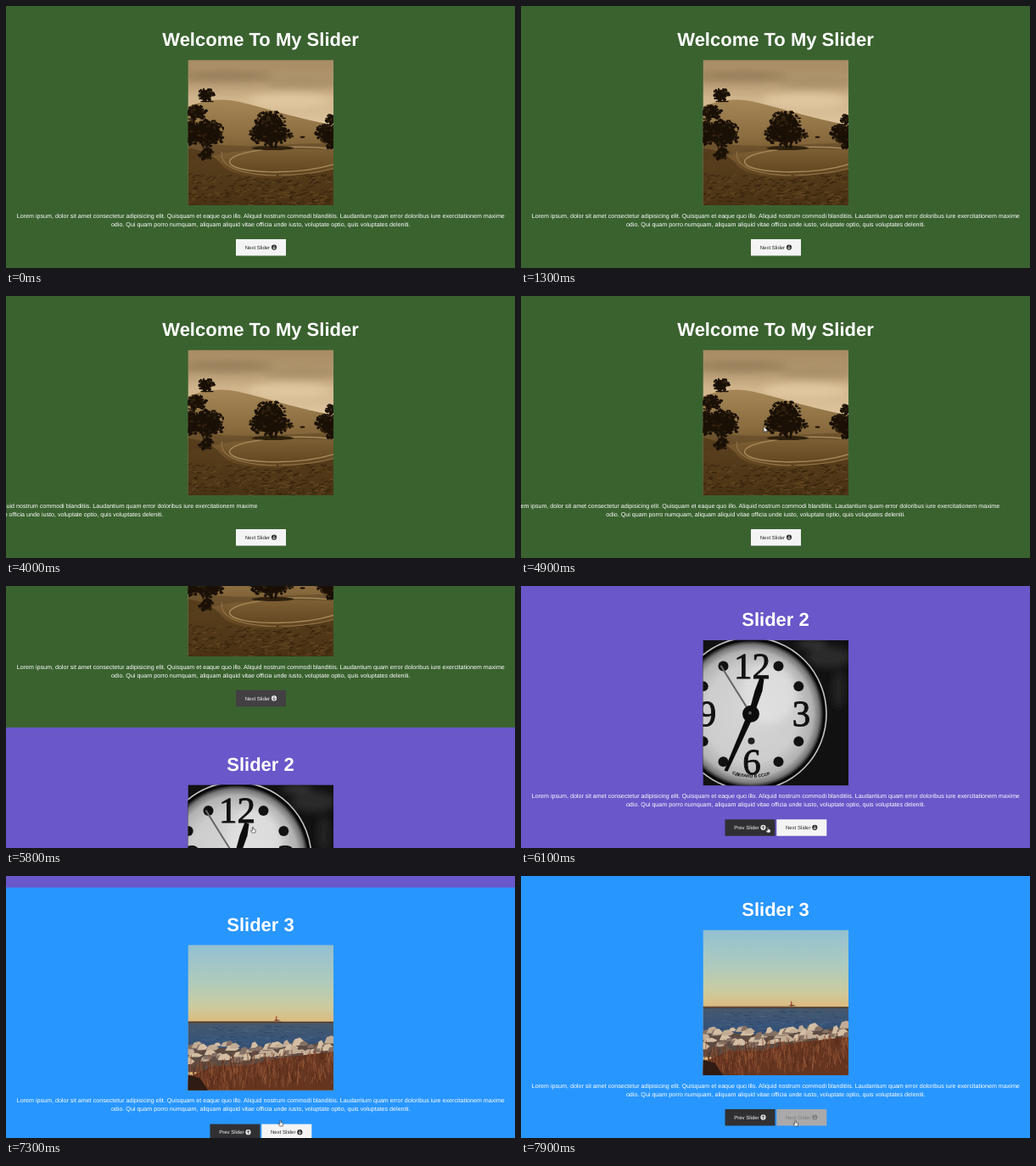
These frames come from a looping animation (600 by 309 pixels, 8 s). An HTML page:

```html
<!DOCTYPE html>
<html lang="en">
<head>
<meta charset="utf-8">
<title>Slider</title>
<style>
  html, body { margin: 0; width: 100%; height: 100%; overflow: hidden; background: #3a622f; }
  svg { display: block; width: 100%; height: 100%; }
  text { font-family: "Liberation Sans", Arial, sans-serif; text-rendering: geometricPrecision; }
  .title { font-size: 22px; font-weight: bold; fill: #fff; text-anchor: middle; }
  .copy { font-size: 7.13px; fill: #fff; text-anchor: middle; }
  .label { font-size: 6.03px; }
  .numeral { font: 43px "Liberation Serif", serif; fill: #111; stroke: #111; stroke-width: .9; text-anchor: middle; }
</style>
</head>
<body>
<svg id="stage" viewBox="0 0 600 309"></svg>
<script>
const LOOP = 8000, SLIDE = 323, PHOTO = 171.5;
const LIGHT = [244, 244, 244], DARK = [48, 48, 51], HOVER = [66, 64, 66], INK = [40, 40, 42];

let seed = 7;
const random = () => (seed = seed * 16807 % 2147483647) / 2147483647;
const between = (a, b) => a + (b - a) * random();
const repeat = (n, make) => Array.from({ length: n }, (_, i) => make(i)).join('');
const rgb = c => `rgb(${c.map(Math.round)})`;
const mix = (a, b, k) => rgb(a.map((v, i) => v + (b[i] - v) * k));
const shape = (d, fill, extra = '') => `<path d="${d}" fill="${fill}" ${extra}/>`;
const line = (d, stroke, width) => shape(d, 'none', `stroke="${stroke}" stroke-width="${width}"`);
const ellipse = (x, y, rx, ry, fill, extra = '') =>
  `<ellipse cx="${x}" cy="${y}" rx="${rx}" ry="${ry}" fill="${fill}" ${extra}/>`;
const stops = list => list.map(([at, color]) => `<stop offset="${at}" stop-color="${color}"/>`).join('');
const gradient = (id, ...list) => `<linearGradient id="${id}" x2="0" y2="1">${stops(list)}</linearGradient>`;
const radial = (id, ...list) => `<radialGradient id="${id}">${stops(list)}</radialGradient>`;
const backdrop = fill => `<rect width="172" height="172" fill="${fill}"/>`;

// A ragged crown: many small leaf clumps scattered over an ellipse
const tree = (x, y, rx, ry, clumps) => ellipse(x, y, rx * .72, ry * .72, '#1a1006') + repeat(clumps, () => {
  const a = between(0, 6.28), r = Math.sqrt(random());
  return ellipse(x + Math.cos(a) * r * rx * .95, y + Math.sin(a) * r * ry * .95,
    between(1, 2.6), between(.8, 2), random() < .85 ? '#1a1006' : '#33230f');
});

function hills() {
  return gradient('sepia', [0, '#a78c64'], [.14, '#b0966f'], [.26, '#cfb48b'], [.42, '#dcc39c']) +
    gradient('meadow', [0, '#a58757'], [.35, '#8a6c3f'], [.65, '#684b24'], [1, '#38230c']) +
    backdrop('url(#sepia)') +
    '<g filter="url(#soft)">' +
      ellipse(45, 19, 55, 6, '#8a7351', 'opacity=".6"') + ellipse(135, 28, 45, 5, '#a0875f', 'opacity=".6"') +
      ellipse(120, 48, 50, 9, '#e4cda6', 'opacity=".7"') + '</g>' +
    shape('M0 55Q30 43 58 49C98 58 130 70 172 77V172H0Z', 'url(#meadow)') +
    shape('M0 96Q45 103 90 101T172 98V106Q90 103 42 110L0 120Z', '#49351a', 'opacity=".35"') +
    shape('M0 104Q28 108 40 124Q52 140 110 139L172 128V172H0Z', '#4f3717', 'opacity=".75"') +
    line('M172 105Q120 99 75 108C32 116 45 131 95 132Q140 133 172 123', '#a58a5a', 1.4) +
    line('M40 108Q36 132 95 136Q140 137 172 128', '#8d7144', 1.2) +
    repeat(260, () => {
      const x = between(0, 170), y = between(136, 172);
      return line(`M${x} ${y}l${between(2, 7)} ${between(-3, 1)}`, random() < .65 ? '#2f1d09' : '#6c5026', .8);
    }) +
    tree(21, 41, 10, 8, 45) + line('M21 44V50M15 49H30', '#1a1006', 1.2) +
    tree(10, 62, 13, 9, 60) + tree(23, 87, 21, 18, 150) + tree(4, 84, 9, 18, 60) + tree(21, 111, 9, 7, 35) +
    tree(97, 76, 20, 18, 130) + tree(97, 88, 27, 13, 140) + ellipse(100, 104, 25, 2.5, '#2e200d') +
    line('M97 84L99 104M105 90L103 104', '#1a1006', 3) +
    tree(163, 86, 13, 11, 80) + tree(169, 99, 5, 9, 30) + tree(168, 70, 5, 6, 25) +
    ellipse(135, 91, 3, 1.2, '#1a1006');
}

function clock() {
  const cx = 56.5, cy = 87;
  const dots = repeat(12, i => {
    if (i % 3 === 0) return '';
    const a = i * Math.PI / 6;
    return ellipse(cx + 65 * Math.sin(a), cy - 65 * Math.cos(a), 6, 6, '#111');
  });
  const numeral = (value, x, y) => `<text class="numeral" x="${x}" y="${y}">${value}</text>`;
  return radial('dial', [0, '#d6d6d6'], [.65, '#cdcdcd'], [.86, '#b2b2b2'], [.95, '#777'], [1, '#1c1c1c']) +
    backdrop('#111') +
    '<g filter="url(#soft)">' + ellipse(148, 20, 26, 12, '#2c2c2c') + ellipse(128, 5, 18, 4, '#3a3a3a') +
      ellipse(160, 58, 8, 22, '#222') + '</g>' +
    ellipse(cx, cy, 89, 90, '#080808', 'stroke="#c4c4c4" stroke-width="1.6"') +
    ellipse(cx, cy, 85, 86, 'url(#dial)') +
    ellipse(78, 62, 32, 36, '#eee', 'opacity=".45" filter="url(#soft)"') + dots +
    numeral(12, 58, 45) + numeral(3, 116, 101) + numeral(6, 57.5, 158) + numeral(9, 5, 101) +
    ellipse(57, 119, 4, 4, '#222') +
    '<path id="rim" d="M26 154Q57 170 92 154" fill="none"/>' +
    '<text font-size="5" font-weight="bold"><textPath href="#rim" startOffset="9">СДЕЛАНО В СССР</textPath></text>' +
    line(`M${cx} ${cy}L21 30`, '#666', 2) +
    shape('M53 86L25 154L29 155L60 89Z', '#0c0c0c') +
    shape('M54 86L61 60L67 44L72 46L70 60L60 88Z', '#0c0c0c') +
    ellipse(cx, cy, 10, 10, '#0c0c0c') + ellipse(cx - 1, cy - 1, 2, 2, '#555');
}

function shore() {
  return gradient('dusk', [0, '#93c0d2'], [.25, '#aecbbd'], [.42, '#cbcb9f'], [.54, '#dfb97c']) +
    gradient('lake', [0, '#46586c'], [.4, '#385478'], [1, '#2d456a']) +
    backdrop('url(#dusk)') +
    '<rect y="92" width="172" height="50" fill="url(#lake)"/>' +
    repeat(110, () => line(`M${between(0, 165)} ${between(95, 120)}h${between(2, 8)}`,
      random() < .5 ? '#536b84' : '#29415f', .6)) +
    line('M0 91.5H172', '#4a3a30', 1.8) + line('M0 90.3H110', '#7a5b40', .6) +
    shape('M103 91L103.6 84H104.8L105.4 91Z', '#a8593c') + line('M102 89H108', '#5f4230', 1) +
    shape('M0 124L30 121L70 124L120 120L172 114V150H0Z', '#5b4b42') +
    repeat(60, i => {
      const x = i * 2.9, y = between(118, 137) - x * .04, w = between(4, 9), h = between(2, 5);
      return shape(`M${x - w} ${y + h}L${x - w * .6} ${y - h * .6}L${x + w * .2} ${y - h}L${x + w} ${y + h * .2}L${x + w * .5} ${y + h}Z`,
        ['#d3bda3', '#c2ac95', '#857064'][i % 3]);
    }) +
    shape('M0 156L30 143L70 142L110 133L172 126V172H0Z', '#653520') +
    repeat(420, () => {
      const x = between(0, 172), y = between(145, 176) - x * .07;
      return line(`M${x} ${y}l${between(-3, 3)} ${-between(5, 16)}`,
        ['#89492e', '#54291a', '#9a5f3b', '#6c3a25'][Math.floor(random() * 4)], .7);
    }) +
    shape('M0 153L14 157L24 172H0Z', '#2f1b14');
}

function button(id, label, x, up, bg, fg) {
  const arrow = up ? 'M45 7.7V11.8M43.1 9.6L45 7.7L46.9 9.6' : 'M45 7.5V11.6M43.1 9.7L45 11.6L46.9 9.7';
  return `<g id="${id}" transform="translate(${x} 275)" fill="${rgb(fg)}" stroke="${rgb(bg)}">
    <rect width="59" height="19.5" fill="${rgb(bg)}" stroke="none"/>
    <text class="label" x="10.7" y="11.8" stroke="none">${label}</text>
    <circle cx="45" cy="9.6" r="3.1" stroke="none"/><path d="${arrow}" fill="none" stroke-width=".8"/></g>`;
}

function slide(index, title, color, photo) {
  const next = x => button('next' + index, 'Next Slider', x, false, LIGHT, INK);
  return `<g transform="translate(0 ${index * SLIDE})">
    <rect y="-4" width="600" height="${SLIDE + .5}" fill="${color}"/>
    <text id="title${index}" class="title" x="300" y="47">${title}</text>
    <svg x="214.5" y="63.6" width="${PHOTO}" height="${PHOTO}">${photo}</svg>
    <g id="copy${index}" class="copy">
      <text x="300.3" y="249.8">Lorem ipsum, dolor sit amet consectetur adipisicing elit. Quisquam et eaque quo illo. Aliquid nostrum commodi blanditiis. Laudantium quam error doloribus iure exercitationem maxime</text>
      <text x="300.3" y="259.9">odio. Qui quam porro numquam, aliquam aliquid vitae officia unde iusto, voluptate optio, quis voluptates deleniti.</text>
    </g>
    ${index ? button('prev' + index, 'Prev Slider', 240.5, true, DARK, LIGHT) + next(301.3) : next(271)}
  </g>`;
}

const $ = id => document.getElementById(id);
$('stage').innerHTML = `<defs><filter id="soft"><feGaussianBlur stdDeviation="4"/></filter></defs>
  <g id="page">
    ${slide(0, 'Welcome To My Slider', '#3a622f', hills())}
    ${slide(1, 'Slider 2', '#6a57c9', clock())}
    ${slide(2, 'Slider 3', '#2896ff', shore())}
  </g>
  <g id="cursor" stroke="#222" stroke-width=".6" fill="#fff">
    <path id="arrow" d="M0 0V7L1.7 5.6L2.8 8L3.9 7.5L2.8 5.2H5Z"/>
    <path id="hand" d="M-.6 -2.5Q0 -3.2 .6 -2.5V-.3L2.8 .3Q3.4 .6 3.2 2L2.6 4H-.8L-2.6 1.4Q-2.4 .5 -.6 1.6Z"/>
  </g>`;

const progress = (t, start, duration) => Math.min(1, Math.max(0, (t - start) / duration));
const swing = k => .5 - Math.cos(k * Math.PI) / 2;

// CSS "ease": cubic-bezier(.25, .1, .25, 1)
function ease(x) {
  const bezier = (a, b, u) => 3 * a * u * (1 - u) ** 2 + 3 * b * u * u * (1 - u) + u ** 3;
  let low = 0, high = 1;
  for (let i = 0; i < 20; i++) {
    const mid = (low + high) / 2;
    if (bezier(.25, .25, mid) < x) low = mid; else high = mid;
  }
  return bezier(.1, 1, low);
}

function enter(id, t, start, duration, dx, dy) {
  const left = t < 2000 ? 0 : 1 - ease(progress(t, start, duration));
  $(id).setAttribute('transform', `translate(${dx * left} ${dy * left})`);
  $(id).style.visibility = t >= 2000 && t < start ? 'hidden' : 'visible';
}

function hover(index, t, start, end) {
  const k = t < end ? ease(progress(t, start, 400)) : 0;
  const next = $('next' + index), background = mix(LIGHT, HOVER, k);
  next.setAttribute('stroke', background);
  next.setAttribute('fill', mix(INK, LIGHT, k));
  next.querySelector('rect').setAttribute('fill', background);
}

function moveCursor(t) {
  const down = swing(progress(t, 4500, 750)), across = swing(progress(t, 6200, 450));
  $('cursor').setAttribute('transform', `translate(${280 + 11 * down + 32.5 * across} ${-12 + 299 * down + 4 * across})`);
  $('cursor').style.display = t < 4500 ? 'none' : '';
  $('arrow').style.display = t < 5200 ? '' : 'none';
  $('hand').style.display = t < 5200 ? 'none' : '';
}

function draw(t) {
  const scroll = SLIDE * (swing(progress(t, 5512, 600)) + swing(progress(t, 6791, 600)));
  $('page').setAttribute('transform', `translate(0 ${-scroll})`);
  enter('title0', t, 3350, 650, 0, -26);
  enter('copy0', t, 3400, 2000, -600, 0);
  hover(0, t, 5200, 6200);
  hover(1, t, 6680, 7500);
  hover(2, t, 7800, LOOP);
  moveCursor(t);
}

const began = performance.now();
(function tick() {
  draw((performance.now() - began) % LOOP);
  requestAnimationFrame(tick);
})();
</script>
</body>
</html>
```
